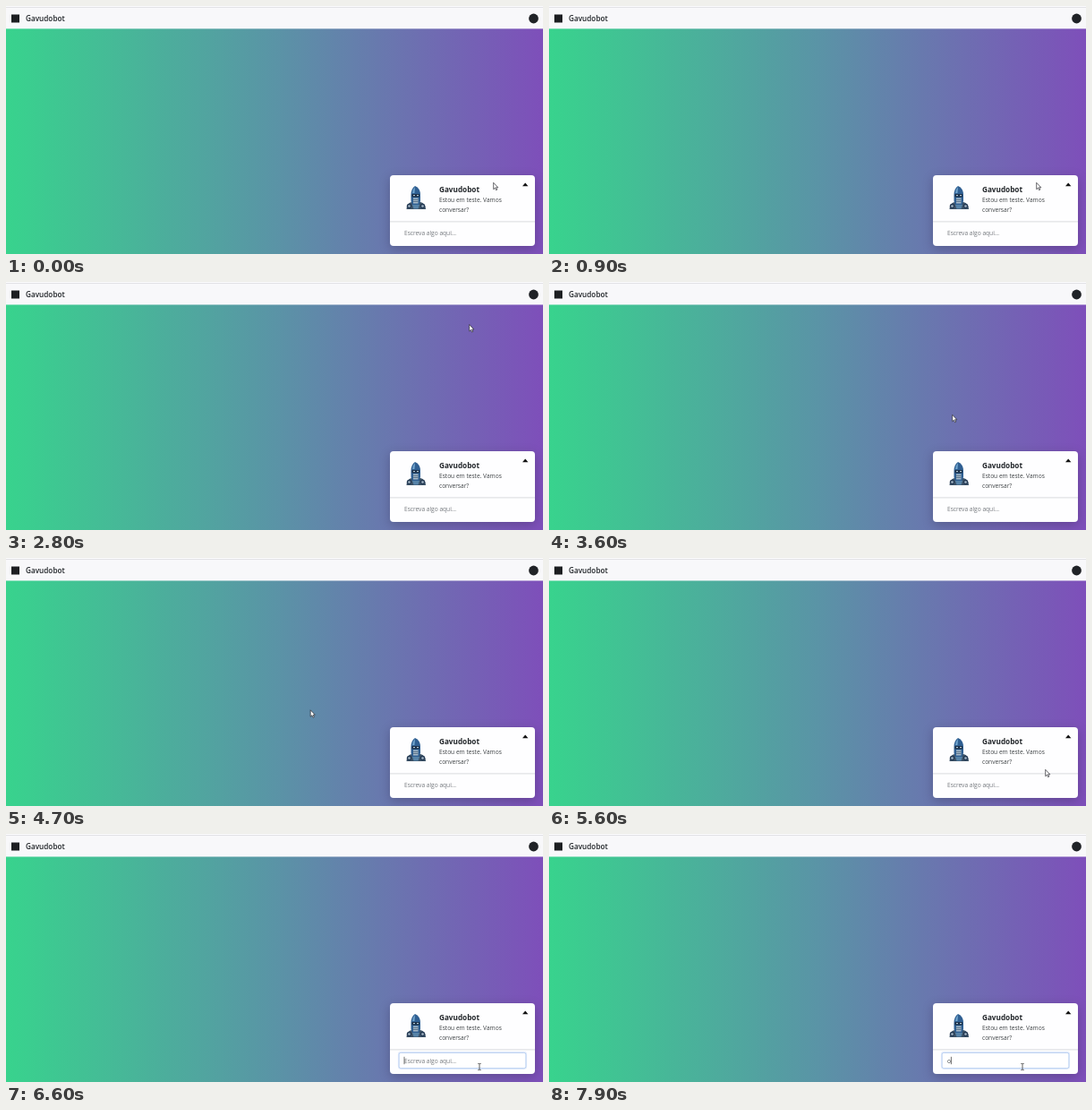
Recreate the animation shown at these times as an HTML page. Size 600 by 277 pixels, loop 8 s.

```html
<!DOCTYPE html>
<html lang="pt">
<head>
<meta charset="utf-8">
<title>Gavudobot</title>
<style>
  html, body { margin: 0; width: 100%; height: 100%; overflow: hidden; }
  svg { display: block; width: 600px; height: 277px; }
  text { font-family: "Open Sans", "Noto Sans", sans-serif; font-size: 6.6px; fill: #3c4043; }
  .name { font-size: 8.2px; font-weight: 700; fill: #212529; }
  .brand { font-weight: 600; }
  #hint { fill: #74787d; }
  .card { filter: drop-shadow(0 3px 6px rgba(0, 0, 0, .2)); }
</style>
</head>
<body>
<svg viewBox="0 0 600 277">
  <defs>
    <linearGradient id="sky">
      <stop offset="0" stop-color="#38d38d"/>
      <stop offset=".5" stop-color="#5a94a6"/>
      <stop offset="1" stop-color="#7e4fba"/>
    </linearGradient>
  </defs>
  <rect y="25" width="600" height="252" fill="url(#sky)"/>

  <!-- Top bar -->
  <rect width="600" height="25.4" fill="#f8f8fa"/>
  <rect width="600" height="1" fill="#fcfcfd"/>
  <rect y="1" width="600" height="1" fill="#e2e2e6"/>
  <rect x="6" y="9.5" width="9" height="9" fill="#1d1f22"/>
  <text class="name brand" x="22" y="16.6">Gavudobot</text>
  <circle cx="589.5" cy="14" r="5.4" fill="#202327"/>

  <!-- Chat card -->
  <rect class="card" x="429" y="189" width="162" height="79" rx="4" fill="#fefeff"/>
  <path d="M429 240.9H591" stroke="#d9dbdf"/>
  <path d="M577 201.2l3.2-3.8 3.2 3.8z" fill="#111"/>
  <text class="name" x="484" y="207.8">Gavudobot</text>
  <text x="484" y="219">Estou em teste. Vamos</text>
  <text x="484" y="230">conversar?</text>

  <!-- Robot portrait -->
  <g>
    <path d="M447.5 227q0-6.5 5.5-8h10q6 1.500 6 8z" fill="#3d5368"/>
    <path d="M452.500 218v-7q0-7 4.500-10 6 2.500 6 10v7l-2 5h-6.500z" fill="#2f5f92"/>
    <path d="M457 202q-3 3-3 7h2.500z" fill="#70a4cd"/>
    <path d="M453.500 210h8.500v3.400h-8.500z" fill="#1c3048"/>
    <path d="M455 211.600h2m2 0h2" stroke="#d4ecfa" stroke-width=".9"/>
    <path d="M455 214.500h5.500v6h-5.500z" fill="#a9bccb"/>
    <path d="M455 216.500h5.500m-5.500 2h5.500" stroke="#31506d" stroke-width=".7"/>
    <circle cx="450.500" cy="223.500" r="2.700" fill="#263b55"/>
    <circle cx="465.500" cy="223.500" r="2.700" fill="#263b55"/>
    <circle cx="450.500" cy="223.500" r="1.300" fill="#a5b8c7"/>
    <circle cx="465.500" cy="223.500" r="1.300" fill="#a5b8c7"/>
    <path d="M454 222h8l-1.500 4.500h-5z" fill="#5683a8"/>
  </g>

  <!-- Message field -->
  <g id="focus">
    <rect x="438.7" y="243.9" width="142.6" height="18.200" rx="2.500" fill="#fff" stroke="#dfe9fa" stroke-width="1.600"/>
    <rect x="439.2" y="244.400" width="141.600" height="17.200" rx="2" fill="#fff" stroke="#a9c5ee" stroke-width=".7"/>
  </g>
  <text id="hint" x="445" y="255.8">Escreva algo aqui...</text>
  <text id="typed" x="445" y="255.8">o</text>
  <path id="caret" d="M0 248.8v8.400" stroke="#333" stroke-width=".7"/>

  <!-- Pointers, hot spot near the origin -->
  <path id="arrow" d="M-.3 .3v7.400l1.700-1.500 1.200 2.500 1.200-.6-1.200-2.400h2.200z" fill="#fff" stroke="#26262c" stroke-width=".7"/>
  <path id="beam" d="M-1.700-3.600h1.200l.5.5.5-.5h1.200M0-3.100v6.200M-1.700 3.600h1.200l.5-.5.5.5h1.200" fill="none" stroke="#333" stroke-width=".8"/>
</svg>
<script>
  const LOOP = 8000, STEP = 100;
  const FOCUS = 6300, TYPE = 7700, BLINK = 500;

  // time, x, y
  const path = [
    [0, 545, 197], [900, 545, 197], [1300, 512, 172], [1800, 461, 108],
    [2000, 527, 33], [2700, 527, 33], [3200, 482, 104], [3600, 451, 148],
    [4100, 345, 158], [4500, 281, 163], [4700, 340.5, 169.5],
    [5100, 432, 190], [5400, 510, 217], [5600, 555, 236],
    [6200, 529, 260], [8000, 529, 260]
  ];
  const el = id => document.getElementById(id);
  const [focus, hint, typed, caret, arrow, beam] =
    ["focus", "hint", "typed", "caret", "arrow", "beam"].map(el);
  const show = (node, on) => { node.style.visibility = on ? "visible" : "hidden"; };

  function pointerAt(t) {
    const i = path.findIndex(p => p[0] > t);
    const [t0, x0, y0] = path[i - 1], [t1, x1, y1] = path[i];
    const k = (t - t0) / (t1 - t0);
    return [x0 + (x1 - x0) * k, y0 + (y1 - y0) * k];
  }

  function draw(t) {
    const [x, y] = pointerAt(t);
    const overField = y > 244;
    const hasText = t >= TYPE;
    const since = t - (hasText ? TYPE : FOCUS);
    const place = `translate(${x} ${y})`;
    arrow.setAttribute("transform", place);
    beam.setAttribute("transform", place);
    show(arrow, !overField);
    show(beam, overField);
    show(focus, t >= FOCUS);
    show(hint, !hasText);
    show(typed, hasText);
    show(caret, since >= 0 && since % (2 * BLINK) < BLINK);
    caret.setAttribute("transform", `translate(${hasText ? 449.4 : 445} 0)`);
  }

  const start = performance.now();
  function tick() {
    const t = (performance.now() - start) % LOOP;
    draw(Math.floor(t / STEP) * STEP);
    requestAnimationFrame(tick);
  }
  tick();
</script>
</body>
</html>
```
